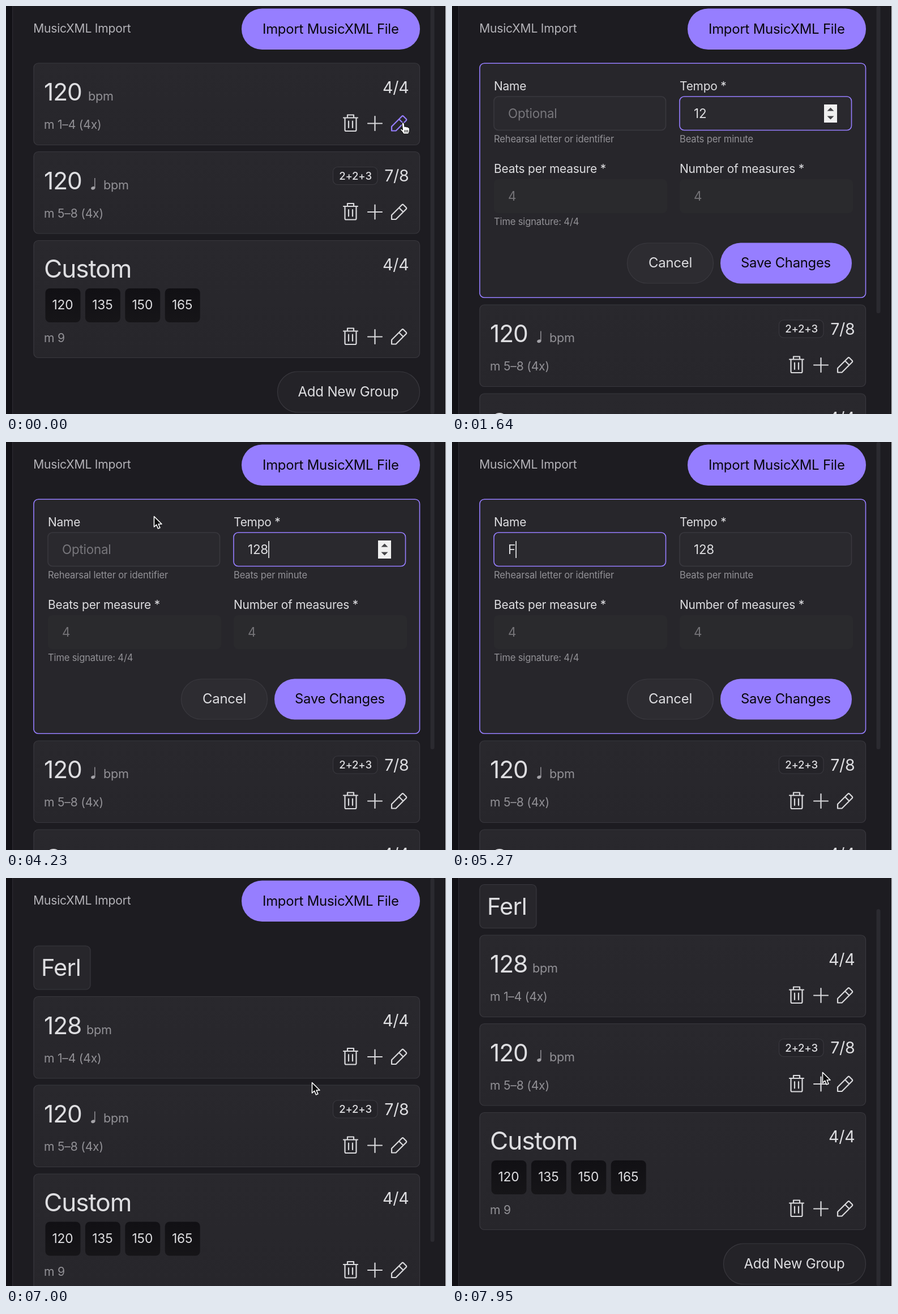
An HTML page for the animation above (8000 ms loop, 777 by 721 pixels).

```html
<!DOCTYPE html>
<html lang="en">
<head>
<meta charset="utf-8">
<title>Tempo editor</title>
<style>
html, body { margin: 0; width: 100%; height: 100%; overflow: hidden; background: #1d1c21; }
svg { display: block; width: 777px; height: 721px; }
text { font-family: Inter, "Open Sans", sans-serif; letter-spacing: -.01em; white-space: pre; }
.icon { fill: none; stroke: #d9d9dc; stroke-width: 2.2; stroke-linecap: round; stroke-linejoin: round; }
</style>
</head>
<body>
<svg id="stage" viewBox="0 0 777 721">
  <defs>
    <linearGradient id="cardFill" x2="0" y2="1">
      <stop stop-color="#29282d"/><stop offset="1" stop-color="#27262b"/>
    </linearGradient>
    <linearGradient id="pillFill" x2="0" y2="1">
      <stop stop-color="#111014"/><stop offset="1" stop-color="#161518"/>
    </linearGradient>
  </defs>
</svg>
<script>
const NS = 'http://www.w3.org/2000/svg';
const LOOP = 8000, NAME = 'Ferl';
const PURPLE = '#967eff', LIGHT = '#dedee1', GREY = '#929196', LINE = '#39383e', INK = '#08070c';
const stage = document.getElementById('stage');

function add(parent, tag, attrs) {
  const el = document.createElementNS(NS, tag);
  for (const k in attrs) el.setAttribute(k, attrs[k]);
  parent.appendChild(el);
  return el;
}
const group = (p, attrs = {}) => add(p, 'g', attrs);
const rect = (p, x, y, width, height, rx, fill, stroke = 'none', sw = 1.2) =>
  add(p, 'rect', { x, y, width, height, rx, fill, stroke, 'stroke-width': sw });
const path = (p, d, attrs = {}) => add(p, 'path', { d, ...attrs });
function label(p, str, x, y, size, fill = LIGHT, anchor = 'start', extra = {}) {
  const el = add(p, 'text', { x, y, 'font-size': size, fill, 'text-anchor': anchor, ...extra });
  el.textContent = str;
  return el;
}
const move = (el, x, y) => el.setAttribute('transform', `translate(${x} ${y})`);
const show = (el, on) => el.setAttribute('visibility', on ? 'visible' : 'hidden');

// Fixed background
rect(stage, 0, 0, 777, 721, 0, '#1d1c21');
rect(stage, 0, 0, 11, 721, 0, '#121116');
rect(stage, 11, 0, 1.2, 721, 0, '#2d2c32');
rect(stage, 776, 0, 1, 721, 0, '#d4d4d8');
const thumb = rect(stage, 749.5, 0, 7, 721, 3.5, '#2b2a30');

// Scrolling page
const page = group(stage);
label(page, 'MusicXML Import', 48.2, 47, 21.1, '#b4b3b8');
rect(page, 416, 4.5, 315, 72.5, 36.2, PURPLE);
label(page, 'Import MusicXML File', 573.3, 49, 23.95, INK, 'middle');

function icons(p, y) {
  const g = group(p, { class: 'icon', transform: `translate(0 ${y})` });
  path(g, 'M596 -10H621M603 -10V-15H614V-10M598.5 -10V11.5Q598.5 13.5 600.5 13.5H616.5Q618.5 13.5 618.5 11.5V-10M605 -4V7.5M612 -4V7.5');
  path(g, 'M639 0H664M651.5 -12.5V12.5');
  return path(g, 'M681 13V5.5L699 -12.5Q700.5 -14 702 -12.5L706.5 -8Q708 -6.5 706.5 -5L688.5 13ZM694 -7.5L701.5 0');
}

function card(p, height, meter, measures, iconY) {
  const g = group(p);
  rect(g, 49, 0, 681.5, height, 8, 'url(#cardFill)', LINE);
  label(g, meter, 711.5, 52.5, 28.6, LIGHT, 'end');
  label(g, measures, 67, iconY + 9.5, 21.1, GREY);
  g.pencil = icons(g, iconY);
  return g;
}
const big = (p, str, y, size = 42.5) =>
  label(p, str, 67, y, size, LIGHT, 'start', { style: 'letter-spacing:-.025em' });

const first = card(page, 144.5, '4/4', 'm 1–4 (4x)', 106.5);
const firstTempo = big(first, '120', 66);
const firstUnit = label(first, 'bpm', 145, 66, 21.7, GREY);

const second = card(page, 144.5, '7/8', 'm 5–8 (4x)', 106.5);
big(second, '120', 66);
label(second, 'bpm', 172, 66, 21.7, GREY);
add(second, 'ellipse', { cx: 153.8, cy: 64.3, rx: 3.7, ry: 2.8, fill: '#a3a2a7', transform: 'rotate(-20 153.8 64.3)' });
rect(second, 156.2, 46.5, 1.3, 17.5, 0, '#a3a2a7');
rect(second, 577.5, 27, 78.5, 31, 8, '#242328', LINE);
label(second, '2+2+3', 617, 49, 18.6, LIGHT, 'middle', { 'font-weight': 500 });

const third = card(page, 207, '4/4', 'm 9', 170);
big(third, 'Custom', 65.5, 44.2);
['120', '135', '150', '165'].forEach((bpm, i) => {
  const x = 69.5 + i * 70.4;
  rect(third, x, 84.5, 62, 60, 8, 'url(#pillFill)');
  label(third, bpm, x + 30.5, 121.5, 22.8, LIGHT, 'middle');
});

const addButton = group(page);
rect(addButton, 479.5, 0, 251, 72, 36, '#242328', LINE);
label(addButton, 'Add New Group', 604.5, 44, 24.1, LIGHT, 'middle');

const tag = group(page);
rect(tag, 49, 120, 100, 77, 8, '#27262b', LINE);
label(tag, NAME, 62, 173, 41.5, LIGHT, 'start', { style: 'letter-spacing:-.02em' });

// Edit form
const form = group(page);
rect(form, 49, 101.2, 681.5, 414, 8, '#27262b', PURPLE, 1.6);
function field(x, y, title, hint, locked) {
  label(form, title, x, y - 11.5, 20.9);
  if (hint) label(form, hint, x, y + 81, 16.6, GREY);
  const box = locked
    ? rect(form, x, y, 306, 60, 8, '#2a2a2d')
    : rect(form, x, y, 303.5, 59.5, 8, '#2a292e', LINE, 1.6);
  const text = label(form, locked ? '4' : '', x + 25, y + 38, 22.4, locked ? '#747377' : LIGHT);
  return { box, text };
}
const nameField = field(74, 160, 'Name', 'Rehearsal letter or identifier');
const tempoField = field(402, 160, 'Tempo *', 'Beats per minute');
field(74, 306, 'Beats per measure *', 'Time signature: 4/4', true);
field(402, 306, 'Number of measures *', '', true);

const spinner = group(form);
rect(spinner, 657, 174, 23, 32, 0, '#f0f0f0');
path(spinner, 'M662.5 185.5L668.5 179.5L674.5 185.5ZM662.5 194.5L668.5 200.5L674.5 194.5Z', { fill: '#454548' });
const caret = rect(form, 0, 175, 1.6, 30, 0, '#f2f2f4');

rect(form, 309.5, 419, 152, 71, 35.5, '#2d2c31', '#3a393f');
label(form, 'Cancel', 385.5, 462, 23.9, LIGHT, 'middle');
const save = group(form);
rect(save, 474, 418.5, 232, 72, 36, PURPLE);
label(save, 'Save Changes', 589.5, 462, 23.8, INK, 'middle');

// Pointers
const pointer = group(stage);
const shapes = {
  arrow: path(pointer, 'M0 0V18.5L4.2 14.7L7 21.5L10.4 20L7.6 13.5H13.5Z',
    { fill: '#08080a', stroke: '#fff', 'stroke-width': 1.6, 'stroke-linejoin': 'round', transform: 'translate(.5 1.5)' }),
  hand: path(pointer, 'M-1.9 1.5Q-1.9 0 0 0Q1.7 0 2 1.5L3 7.5Q5 6 6.5 8Q8.5 7 9.5 9Q11.5 8.5 11.5 11V14Q11.5 17 9.5 20H1Q-1 16.5 -4 13.5Q-5.5 11.5 -3.6 11Q-2.2 11 -.5 13ZM3.2 13V17.5M5.8 13V17.5M8.3 13V17.5',
    { fill: '#fff', stroke: '#111', 'stroke-width': 1.1, 'stroke-linejoin': 'round' }),
  beam: path(pointer, 'M-3.5 -9Q0 -9 0 -7Q0 -9 3.5 -9M0 -7V7M-3.5 9Q0 9 0 7Q0 9 3.5 9',
    { fill: 'none', stroke: '#e6e6e8', 'stroke-width': 1.4 })
};

// Timeline tables
const EDIT = 90, SAVED = 6480;
const route = [
  [0, 701, 206], [200, 701, 206], [500, 655, 202], [820, 602, 190],
  [3090, 602, 190], [3180, 655, 390], [3270, 704, 475], [3400, 708, 483], [3560, 700, 474],
  [3860, 565, 428], [4050, 395, 268], [4230, 261, 130], [4400, 262, 190],
  [5780, 262, 190], [5950, 370, 310], [6200, 531, 439], [6480, 531, 439], [6950, 540, 360],
  [7320, 540, 360], [7600, 600, 352], [7900, 654, 342]
];
const lift = [
  [3160, 0], [3230, -2], [3270, -1.5], [3350, 0], [3480, 0], [3640, -3],
  [3880, -3], [4030, 0], [6060, 0], [6220, -3]
];
const tempoSteps = [[0, '120'], [1640, '12'], [2320, '128']];
const nameSteps = [[0, 0], [5230, 1], [5450, 2], [5640, 3], [5770, 4]];
const hiddenSteps = [[0, 0], [1640, 1], [3090, 0], [5230, 1], [5780, 0]];
const caretSteps = [
  [0, 0], [820, 1], [1270, 0], [1770, 1], [2140, 0], [2320, 1], [2770, 0], [3290, 1],
  [3770, 0], [4210, 1], [5000, 0], [5230, 1], [6250, 0]
];

const at = (steps, t) => steps.filter(s => s[0] <= t).pop()[1];
const smooth = p => p * p * (3 - 2 * p);
const clamp = p => Math.min(1, Math.max(0, p));
function tween(keys, t, i = 1) {
  const n = keys.findIndex(k => k[0] > t);
  if (n === 0) return keys[0][i];
  if (n < 0) return keys[keys.length - 1][i];
  const a = keys[n - 1], b = keys[n];
  return a[i] + (b[i] - a[i]) * smooth((t - a[0]) / (b[0] - a[0]));
}

function pointerKind(t, x, y) {
  if (t < EDIT) return 'hand';
  if (t >= SAVED) return 'arrow';
  const inRow = y > 160 && y < 220;
  if (inRow && (x > 74 && x < 378 || x > 402 && x < 706)) return 'beam';
  const capX = Math.min(670, Math.max(510, x));
  return Math.hypot(x - capX, y - 454) < 36 ? 'hand' : 'arrow';
}

function render(t) {
  const editing = t >= EDIT && t < SAVED, saved = t >= SAVED;
  const shift = editing ? 270.5 : saved ? 108.5 : 0;
  const p = smooth(clamp((t - 7320) / 560));

  move(page, 0, -108.5 * p);
  move(first, 0, 101 + (saved ? 108.5 : 0));
  move(second, 0, 257.5 + shift);
  move(third, 0, 414.5 + shift);
  move(addButton, 0, 646 + shift);
  show(first, !editing);
  show(form, editing);
  show(tag, saved);
  firstTempo.textContent = saved ? '128' : '120';
  firstUnit.setAttribute('x', saved ? 142 : 145);
  first.pencil.style.stroke = saved ? '' : PURPLE;
  thumb.setAttribute('y', 55 * p);
  thumb.setAttribute('height', editing ? 543 : saved ? 643 + 23 * p : 721);

  const onTempo = t >= 820 && t < 4550, onName = t >= 4550;
  const typed = NAME.slice(0, at(nameSteps, t));
  nameField.text.textContent = typed || 'Optional';
  nameField.text.setAttribute('fill', typed ? LIGHT : '#77767b');
  tempoField.text.textContent = at(tempoSteps, t);
  nameField.box.setAttribute('stroke', onName ? PURPLE : LINE);
  tempoField.box.setAttribute('stroke', onTempo ? PURPLE : LINE);
  show(spinner, editing && onTempo);
  show(caret, editing && at(caretSteps, t));
  const width = onName ? (typed ? nameField.text.getComputedTextLength() : 0)
                       : tempoField.text.getComputedTextLength();
  caret.setAttribute('x', (onName ? 99 : 427) + width + .3);
  move(save, 0, tween(lift, t));

  const x = tween(route, t), y = tween(route, t, 2), kind = pointerKind(t, x, y);
  move(pointer, x, y);
  for (const k in shapes) show(shapes[k], k === kind && !at(hiddenSteps, t));
}

const start = performance.now();
function tick() {
  render((performance.now() - start) % LOOP);
  requestAnimationFrame(tick);
}
tick();
</script>
</body>
</html>
```
